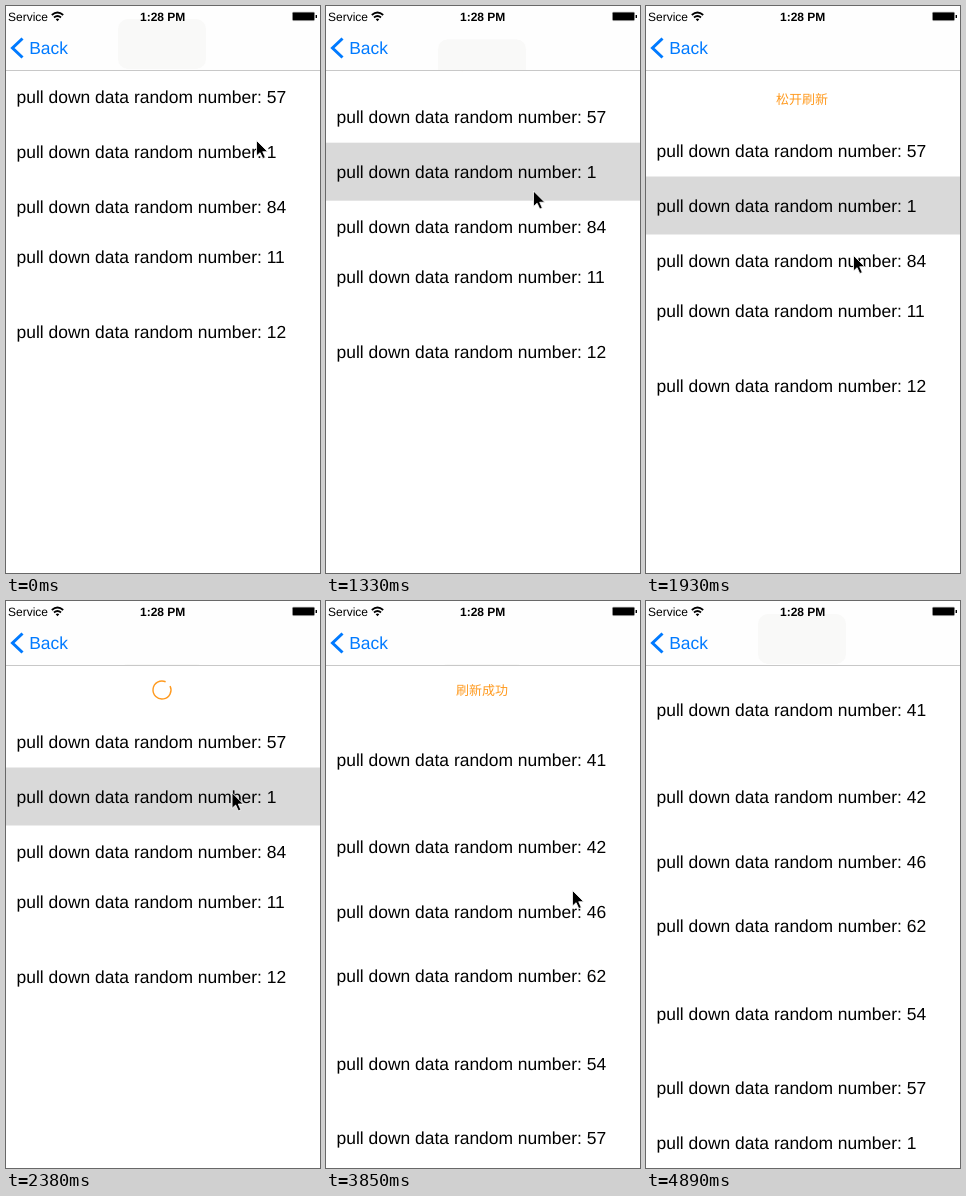
Write an HTML page that moves like this. It is 314x567 px and loops after 5450 ms.

```html
<!DOCTYPE html>
<html lang="en">
<head>
<meta charset="utf-8">
<style>
html, body { margin: 0; width: 100%; height: 100%; overflow: hidden; background: #fff; }
svg { display: block; font-family: "Liberation Sans", Arial, sans-serif; font-size: 17.45px; text-rendering: geometricPrecision; }
.status { font-size: 12px; }
#label { font: 13px "Noto Sans CJK SC", "Noto Sans CJK", sans-serif; fill: #ff9a1f; text-anchor: middle; }
</style>
</head>
<body>
<svg width="314" height="567" viewBox="0 0 314 567">
  <defs><clipPath id="bar"><rect width="314" height="64"/></clipPath></defs>
  <g id="content">
    <text id="label" x="156" y="43.7"></text>
    <path id="spinner" d="M8.46 3.08A9 9 0 1 1 8.46 -3.08" fill="none" stroke="#ff9a1f" stroke-width="1.4"/>
    <rect id="pressed" y="116.5" width="314" height="58" fill="#d9d9d9"/>
    <g id="before"></g>
    <g id="after"></g>
  </g>
  <rect width="314" height="64" fill="#fefefe"/>
  <g clip-path="url(#bar)"><rect id="haze" x="112" y="13" width="88" height="50" rx="10" fill="#f9f9f8"/></g>
  <rect y="64" width="314" height="1" fill="#c8c8c8"/>
  <g class="status">
    <text x="2" y="14.5">Service</text>
    <text x="134" y="14.5" font-weight="bold">1:28 PM</text>
  </g>
  <path d="M45.8 9Q51.5 4 57.2 9M48 11.5Q51.5 8.5 55 11.5" fill="none" stroke="#000" stroke-width="1.8"/>
  <path d="M49.7 13.3Q51.5 11.8 53.3 13.3L51.5 15.2Z"/>
  <rect x="286.5" y="6.2" width="22" height="8.4" rx="1" stroke="#999" stroke-width=".5"/>
  <rect x="309.6" y="9" width="1.4" height="3"/>
  <path d="M16.5 32.5L6.5 42L16.5 51.5" fill="none" stroke="#007aff" stroke-width="3"/>
  <text x="23.2" y="48" fill="#007aff">Back</text>
  <path id="cursor" d="M0 0V15.5L3.6 12.2L6.3 18L8.8 17L6.2 11.2H11.2Z" stroke="#fff" stroke-width=".8"/>
</svg>
<script>
const LOOP = 5450, STEP = 148.3;
const $ = id => document.getElementById(id);

// row number, vertical centre
const rows = {
  before: [[57, 91], [1, 146], [84, 201], [11, 251], [12, 326]],
  after: [[41, 109.5], [42, 196], [46, 261], [62, 325], [54, 413], [57, 487], [1, 542]]
};
for (const id in rows) {
  $(id).innerHTML = rows[id].map(([n, y]) =>
    `<text x="10.6" y="${y + 5.7}">pull down data random number: ${n}</text>`).join("");
}

const show = (id, on) => $(id).setAttribute("visibility", on ? "visible" : "hidden");
const place = (id, transform) => $(id).setAttribute("transform", transform);

function draw(time) {
  // the screen refreshes in even steps
  const t = Math.floor((time + 10) / STEP) * STEP;
  const ease = (from, to) => {
    const p = Math.min(1, Math.max(0, (t - from) / (to - from)));
    return p * p * (3 - 2 * p);
  };
  const aim = ease(300, 590), drag = ease(1040, 1750), lift = ease(2230, 2520);
  const lower = ease(3420, 3850), close = ease(4000, 4450), leave = ease(4450, 4890);
  const x = 250.5 - 43 * aim + 38 * lift + lower + 28 * leave;
  const y = 134.5 + 12 * aim + 103 * drag - 118 * lift + 158 * lower + 281 * leave;

  const done = t >= 3110, loading = t >= 2370 && !done;
  const pull = done || loading ? 50 * (1 - close) : 54 * drag;
  place("content", `translate(0 ${pull})`);
  place("haze", `translate(0 ${pull})`);
  place("cursor", `translate(${x} ${y})`);
  place("spinner", `translate(156 39) rotate(${-48 + (t - 2370) * 0.6})`);
  $("label").textContent = done ? "刷新成功" : pull > 45 ? "松开刷新" : "下拉刷新";
  show("label", !loading);
  show("spinner", loading);
  show("pressed", t >= 740 && !done);
  show("before", !done);
  show("after", done);
}

const start = performance.now();
function frame() {
  draw((performance.now() - start) % LOOP);
  requestAnimationFrame(frame);
}
frame();
</script>
</body>
</html>
```
